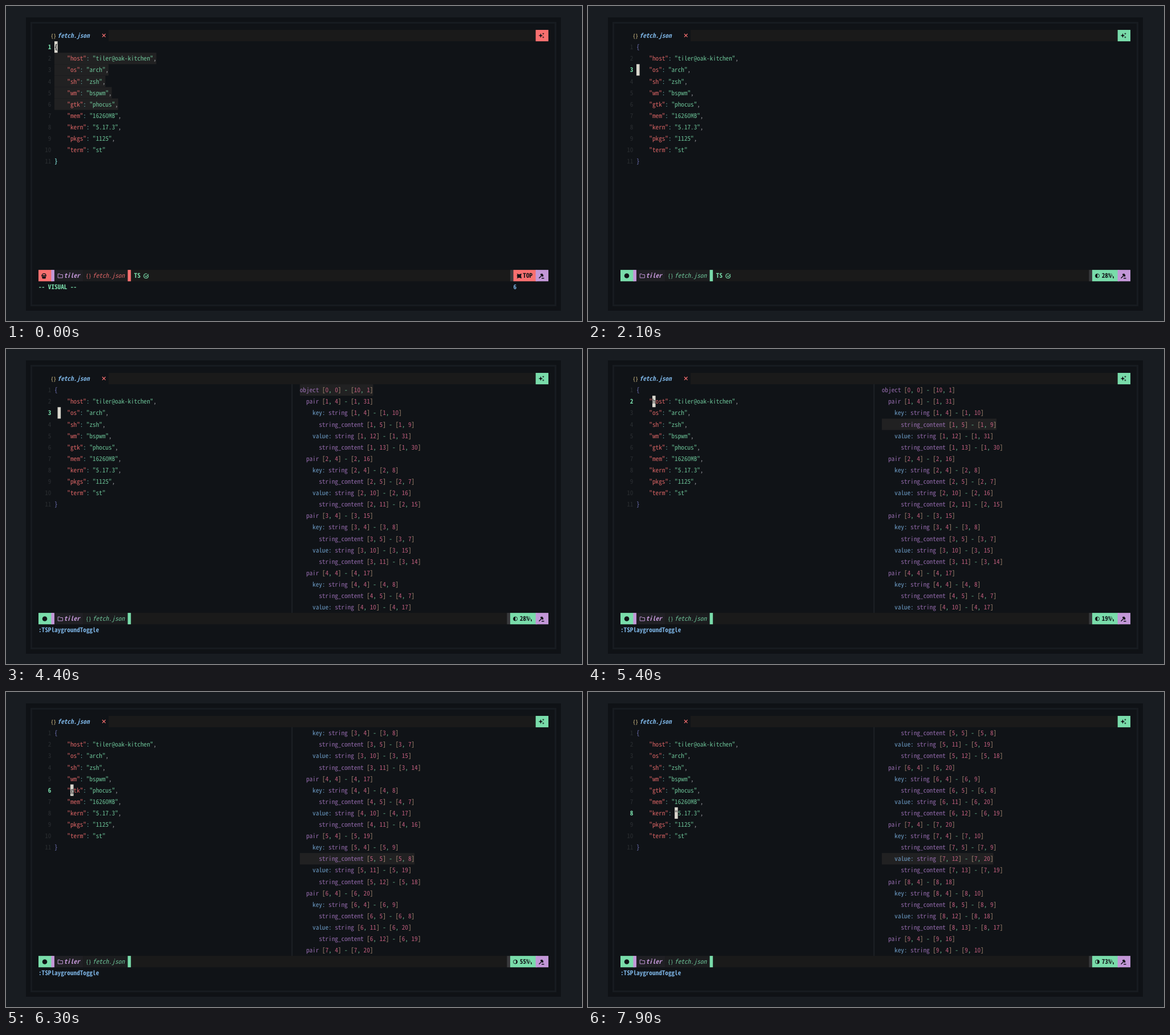
These frames come from a looping animation (1011 by 554 pixels, 8 s). An HTML page:

```html
<!DOCTYPE html>
<html lang="en">
<head>
<meta charset="utf-8">
<title>Editor</title>
<style>
html, body { margin: 0; width: 100%; height: 100%; overflow: hidden; background: #181c21; }
svg { display: block; width: 1011px; height: 554px; }
text {
  font: 11.19px "Noto Sans Mono CJK JP", "Noto Sans Mono CJK SC", "Noto Sans Mono CJK KR", "Noto Sans Mono", monospace;
  font-variant-ligatures: none;
  text-rendering: geometricPrecision;
  fill-opacity: .86;
}
.b { font-weight: 700; fill-opacity: 1; }
.i { font-style: italic; }
.s { font-size: 9px; fill-opacity: 1; }
</style>
</head>
<body>
<svg viewBox="0 0 1011 554">
  <rect x="35" y="20" width="939" height="516" fill="#0f1216"/>
  <rect x="43" y="28" width="923" height="500" fill="#171b20"/>
  <rect x="46" y="31" width="917" height="494" fill="#101317"/>
  <g id="screen"></g>
</svg>
<script>
const W = 5.594, H = 20.1, LOOP = 8000;
const X = c => 57 + c * W, Y = r => 42 + r * H;
const C = {
  bg: '#101317', bar: '#1a1a1a', sel: '#212122', dim: '#2f3236', fg: '#b9bcc0', cursor: '#d9d6cd',
  red: '#f87070', green: '#79dcaa', yellow: '#ffe59e', blue: '#7ab0df', purple: '#c397d8',
  cyan: '#70c0ba', brace: '#8387d8', pink: '#d8688c', bracket: '#cfab8c', node: '#a878c4', num: '#d8688c'
};
const modeColor = { v: C.red, n: C.green, c: C.yellow };

const data = {
  host: 'tiler@oak-kitchen', os: 'arch', sh: 'zsh', wm: 'bspwm', gtk: 'phocus',
  mem: '16260MB', kern: '5.17.3', pkgs: '1125', term: 'st'
};
const code = JSON.stringify(data, null, 4).split('\n');

// Syntax tree listing: five rows for each pair.
const tree = ['object [0, 0] - [10, 1]'];
Object.entries(data).forEach(([key, value], i) => {
  const row = i + 1, k = 6 + key.length, v = k + 2, end = v + value.length + 2;
  const span = (a, b) => `[${row}, ${a}] - [${row}, ${b}]`;
  tree.push(`  pair ${span(4, end)}`,
    `    key: string ${span(4, k)}`, `      string_content ${span(5, k - 1)}`,
    `    value: string ${span(v, end)}`, `      string_content ${span(v + 1, end - 1)}`);
});

// time, line, column, modes (status bar + tab button), tree row
const steps = [
  [0, 1, 0, 'vv'], [700, 2, 0, 'vv'], [900, 3, 0, 'vv'], [1100, 4, 0, 'vv'], [1200, 5, 0, 'vv'],
  [1400, 5, 0, 'nv'], [1900, 4, 0, 'nn'], [2100, 3, 0, 'nn'],
  [2700, 3, 0, 'cn'], [3100, 3, 0, 'cc'],
  [3400, 3, 0, 'nn', 0], [4400, 3, 1, 'nn', 0], [4700, 2, 1, 'nn', 0], [4800, 2, 2, 'nn', 0],
  [5100, 2, 3, 'nn', 0], [5200, 2, 4, 'nn', 2], [5400, 2, 5, 'nn', 3],
  [5800, 3, 5, 'nn', 3], [5900, 4, 5, 'nn', 8], [6000, 4, 5, 'nn', 13],
  [6100, 5, 5, 'nn', 13], [6200, 6, 5, 'nn', 18], [6300, 6, 5, 'nn', 23],
  [6600, 6, 6, 'nn', 23], [6700, 6, 7, 'nn', 23], [6900, 6, 8, 'nn', 22], [7000, 6, 9, 'nn', 21],
  [7100, 6, 10, 'nn', 21], [7200, 6, 11, 'nn', 24], [7300, 6, 12, 'nn', 24], [7400, 6, 12, 'nn', 25],
  [7700, 7, 12, 'nn', 30], [7900, 8, 12, 'nn', 34]
];
let scroll = 0;
const states = steps.map(([at, line, col, modes, node]) => {
  if (node !== undefined) scroll = Math.max(scroll, node - 11);
  return { at, line, col, mode: modes[0], button: modes[1], node, scroll };
});

const box = (c, r, w, fill) =>
  `<rect x="${X(c)}" y="${Y(r)}" width="${w * W}" height="${H}" fill="${fill}"/>`;
const put = (s, c, r, fill, cls = '') => {
  const xs = [...s].map((_, i) => (X(c + i)).toFixed(2)).join(' ');
  return `<text x="${xs}" y="${(Y(r) + 14.1).toFixed(2)}" fill="${fill}" class="${cls}">${s}</text>`;
};
const tokens = (s, re, c, r, paint) =>
  [...s.matchAll(re)].map(m => put(m[0], c + m.index, r, paint(m[0], m.index))).join('');
const shape = (d, fill) => `<path d="${d}" fill="${fill}"/>`;
const stroke = (d, color, w = 1) => `<path d="${d}" fill="none" stroke="${color}" stroke-width="${w}"/>`;
const disc = (x, y, r, fill) => `<circle cx="${x}" cy="${y}" r="${r}" fill="${fill}"/>`;
const braces = (c, r, fill) => put('{', c - .1, r - .03, fill, 's') + put('}', c + .75, r - .03, fill, 's');
const star = (x, y, r) => {
  const q = r * .28;
  return `M${x} ${y - r}l${q} ${r - q} ${r - q} ${q} ${q - r} ${q} ${-q} ${r - q} ${-q} ${q - r} ${q - r} ${-q} ${r - q} ${-q}z`;
};

function paintCode(s, i) {
  if (s === '{' || s === '}') return C.brace;
  if (s === ':') return C.cyan;
  if (s === ',') return C.fg;
  return i === 4 ? C.red : C.green;
}
function paintTree(s) {
  if (s.endsWith(':')) return C.blue;
  if (/\d/.test(s)) return C.num;
  if (/[[\]]/.test(s)) return C.bracket;
  return /[,-]/.test(s) ? C.green : C.node;
}

function tabs(s) {
  return braces(4, 0, C.yellow) + put('fetch.json', 6, 0, C.blue, 'b i') +
    stroke('M169 49l5.6 5.6m0-5.6l-5.6 5.6', C.red, 1.2) +
    box(22, 0, 134, C.bar) + box(156, 0, 4, modeColor[s.button]) +
    shape(star(938.5, 52, 4) + star(943, 48.8, 2) + star(943, 55, 2), C.bg);
}

function editor(s) {
  let out = '';
  code.forEach((text, i) => {
    const n = i + 1, now = n === s.line;
    if (s.mode === 'v' && n >= s.line && n <= 6) out += box(5, n, text.length, C.sel);
    out += put(String(n), n > 9 ? 2 : 3, n, now ? C.green : C.dim, now ? 'b' : '');
    if (n === 11 && s.line === 1) out += put('}', 5, n, C.cyan, 'b');
    else out += tokens(text, /"[^"]*"|[:,{}]/g, 5, n, paintCode);
  });
  if (s.mode !== 'c') {
    const ch = code[s.line - 1][s.col];
    out += box(5 + s.col, s.line, 1, C.cursor);
    if (ch !== ' ') out += put(ch, 5 + s.col, s.line, C.bg, s.line === 1 ? 'b' : '');
  }
  return out;
}

function panel(s) {
  if (s.node === undefined) return '';
  let out = `<rect x="501" y="62" width="2" height="402" fill="#1c2025"/>`;
  for (let r = 0; r < 20; r++) {
    const text = tree[s.scroll + r];
    if (!text) break;
    if (s.scroll + r === s.node) out += box(82, r + 1, text.length, C.sel);
    out += tokens(text, /\w+:?|[[\],-]/g, 82, r + 1, paintTree);
  }
  return out;
}

function modeIcon(mode) {
  if (mode === 'n') return disc(68, 474.5, 4.3, C.bg);
  if (mode === 'c') return stroke('M63 471l4 3.7-4 3.7m5 0h5', C.bg, 1.4);
  return stroke('M63.2 474a3.4 3.4 0 0 1 6.8 0', C.bg, 1.3) +
    shape('M62.2 473.4h8.6v2h-8.6zM63 476h7.2l-.8 3.6h-5.6z', C.bg);
}

function leftBar(s, color) {
  if (s.button === 'c') {
    return box(0, 21, 4, '#15302b') +
      `<text x="62" y="477" fill="${C.green}" class="b" style="font-size:7.5px">[@]</text>` +
      put('TSPlaygroundToggle', 5, 21, C.pink) +
      shape('M191.5 479v-4.5a4 4 0 0 1 8 0v4.5l-1.6-1.2-1.2 1.2-1.2-1.2-1.2 1.2-1.2-1.2z', color) +
      disc(194, 474.5, .9, C.bar) + disc(197, 474.5, .9, C.bar) +
      put('CMD', 26, 21, color) + put('S', 31, 21, C.green, 'b');
  }
  return box(0, 21, 4.5, color) + modeIcon(s.mode) + box(4, 21, 1, C.purple) +
    box(5, 21, 9, '#202024') + box(14, 21, 14, '#1c1d1f') +
    stroke('M91.2 471.2h3l1.2 1.3h4v5.5h-8.2z', C.purple) +
    put('tiler', 8, 21, C.purple, 'b i') +
    braces(15, 21, color) + put('fetch.json', 17, 21, color, 'i') + box(28, 21, 1, color) +
    (s.node === undefined ? put('TS', 30, 21, C.green, 'b') : '');
}

function moon(pct) {
  const x = 894, y = 474.5, r = 3.5;
  const half = side => `M${x} ${y - r}a${r} ${r} 0 0 ${side} 0 ${2 * r}z`;
  const thin = side => `M${x} ${y - r}a${r} ${r} 0 0 ${side} 0 ${2 * r}a5 5 0 0 ${1 - side} 0 ${-2 * r}z`;
  const d = pct < 30 ? half(0) : pct < 40 ? thin(0) : pct < 50 ? '' : pct < 60 ? thin(1) : half(1);
  return `<circle cx="${x}" cy="${y}" r="${r}" fill="none" stroke="${C.bg}" stroke-width=".9"/>` + shape(d, C.bg);
}

function rightBar(s, color) {
  const top = s.line === 1, at = top ? 149 : 148;
  const pct = Math.ceil(s.line / code.length * 100);
  let out = box(at - 1, 21, 1, '#38383b') + box(at, 21, 156.5 - at, color) + box(156, 21, 4, C.purple);
  if (top) {
    out += shape('M896.5 470.5l4 1.5 4.5-1.5-1 4 1 4.7-4.2-1.4-4.3 1.4 1.2-2.6-1.2-2 1.2-1.6z', C.bg) +
      put('TOP', 152, 21, C.bg, 'b');
  } else {
    const tiny = (ch, x, y) => `<text x="${x}" y="${y}" fill="${C.bg}" class="b" style="font-size:5px">${ch}</text>`;
    out += moon(pct) + put(pct + '%', 151, 21, C.bg, 'b') + tiny('L', 918.6, 474.5) + tiny('N', 920.8, 479);
  }
  return out + stroke('M935.5 478.8l4-4m-1.2-3.6l4.6 4.6m-3.2-3.2l1.6-1.6m-1.2 7.8h4.4', C.bg, 1.5) +
    shape('M938 473l2.6-2.6 3 3-2.6 2.6z', C.bg);
}

function status(s) {
  const color = modeColor[s.mode];
  let out = box(0, 21, 160, C.bar) + leftBar(s, color) + rightBar(s, color);
  if (s.node === undefined) out += stroke('M249.6 473.6a4 4 0 1 1-2-2.4M244 474.4l1.9 1.9 4.3-4.6', C.green, 1.1);
  return out;
}

function prompt(s) {
  if (s.mode === 'v') {
    return put('--', 0, 22, C.green, 'b') + put('VISUAL', 3, 22, C.green, 'b') +
      put('--', 10, 22, C.green, 'b') + put(String(7 - s.line), 149, 22, C.blue, 'b');
  }
  const full = s.button === 'c' || s.node !== undefined;
  if (!full && s.mode !== 'c') return '';
  const text = full ? ':TSPlaygroundToggle' : ':';
  return put(text, 0, 22, C.blue, 'b') + (s.mode === 'c' ? box(text.length, 22, 1, C.cursor) : '');
}

const screenEl = document.getElementById('screen');
const start = performance.now();
let shown = -1;
function tick() {
  const t = (performance.now() - start) % LOOP;
  const i = states.findLastIndex(s => s.at <= t);
  if (i !== shown) {
    const s = states[shown = i];
    screenEl.innerHTML = tabs(s) + editor(s) + panel(s) + status(s) + prompt(s);
  }
  requestAnimationFrame(tick);
}
tick();
</script>
</body>
</html>
```
